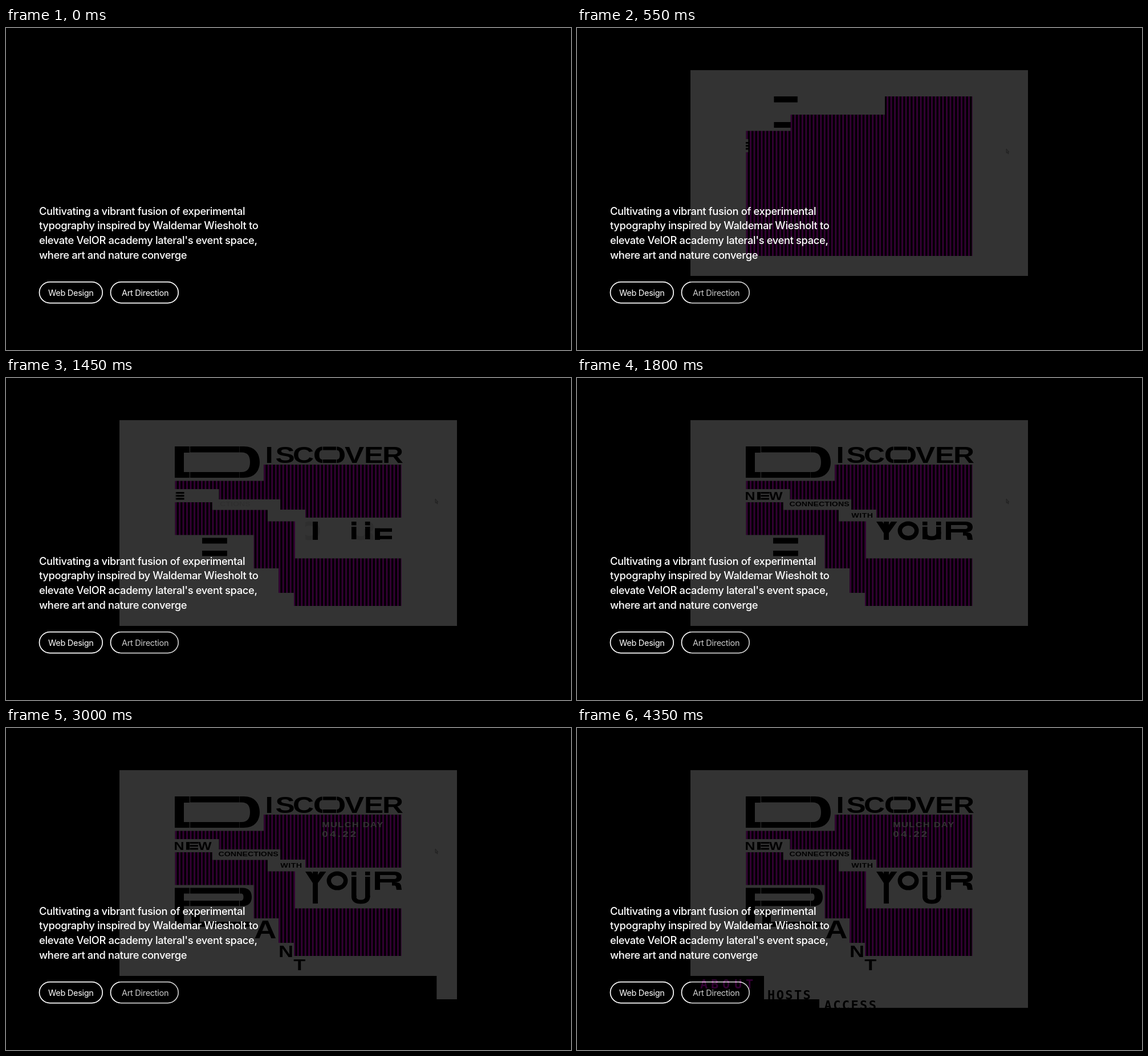
Write an HTML page that moves like this. It is 991x565 px and loops after 4.4 s.

```html
<!DOCTYPE html>
<html lang="en">
<head>
<meta charset="utf-8">
<title>Project teaser</title>
<style>
html, body { margin: 0; width: 100%; height: 100%; overflow: hidden; background: #000; }
svg { display: block; width: 991px; height: 565px; }

.copy, .tag { font-family: Inter, "Open Sans", sans-serif; fill: #fff; letter-spacing: -.02em; }
.copy { font-size: 18.36px; font-weight: 500; }
.tag { font-size: 14.5px; }
.pill { fill: none; stroke: #fff; stroke-width: 1.7; }
.wide { font-family: "Liberation Sans", Arial, sans-serif; font-weight: 700; transform: scaleX(1.25); }
.mono { font: 700 22px "DejaVu Sans Mono", monospace; letter-spacing: 2.4px; }

/* Every moving part goes from --from / --o to its resting pose within its time slot */
.a {
  --from: none; --o: 1;
  animation: 4.4s cubic-bezier(.37, 0, .63, 1) infinite;
  transform-box: fill-box;
}
.in { --from: translateX(-54px); --o: 0; }
.fade { --o: 0; }
.hole { --from: scaleX(0); transform-origin: left; }
.row { --from: scaleX(0); transform-origin: right; }
.bar { --from: scaleX(.48); transform-origin: center; }

@keyframes t300  { 0%, 6.7%   { transform: var(--from); opacity: var(--o) } 16.9%, 100%  { transform: none; opacity: 1 } }
@keyframes t325  { 0%, 7.39%  { transform: var(--from); opacity: var(--o) } 17.6%, 100%  { transform: none; opacity: 1 } }
@keyframes t500  { 0%, 11.3%  { transform: var(--from); opacity: var(--o) } 19.3%, 100%  { transform: none; opacity: 1 } }
@keyframes t550  { 0%, 12.5%  { transform: var(--from); opacity: var(--o) } 19.3%, 100%  { transform: none; opacity: 1 } }
@keyframes t850  { 0%, 19.32% { transform: var(--from); opacity: var(--o) } 30.68%, 100% { transform: none; opacity: 1 } }
@keyframes t1350 { 0%, 31%    { transform: var(--from); opacity: var(--o) } 40.8%, 100%  { transform: none; opacity: 1 } }
@keyframes t1900 { 0%, 43.2%  { transform: var(--from); opacity: var(--o) } 53.4%, 100%  { transform: none; opacity: 1 } }
@keyframes t2000 { 0%, 45.5%  { transform: var(--from); opacity: var(--o) } 55.7%, 100%  { transform: none; opacity: 1 } }
@keyframes t2600 { 0%, 58.5%  { transform: var(--from); opacity: var(--o) } 68%, 100%    { transform: none; opacity: 1 } }
@keyframes t2780 { 0%, 63.1%  { transform: var(--from); opacity: var(--o) } 91.4%, 100%  { transform: none; opacity: 1 } }
@keyframes t3150 { 0%, 71.6%  { transform: var(--from); opacity: var(--o) } 95.4%, 100%  { transform: none; opacity: 1 } }
@keyframes t3400 { 0%, 77.3%  { transform: var(--from); opacity: var(--o) } 89.8%, 100%  { transform: none; opacity: 1 } }

.screen { animation: show 4.4s linear infinite; }
@keyframes show { 0%, .6% { opacity: 0 } 4.5%, 100% { opacity: .2 } }
.cursor { animation: leave 4.4s ease-in infinite; }
@keyframes leave {
  0%, 95.4% { transform: none; opacity: 1 }
  98.75% { transform: translateX(23px); opacity: 1 }
  98.8%, 100% { transform: translateX(23px); opacity: 0 }
}
</style>
</head>
<body>
<svg viewBox="0 0 991 565">
  <defs>
    <pattern id="stripes" patternUnits="userSpaceOnUse" x="296.5" y="0" width="6.49" height="10">
      <rect width="6.49" height="10"/>
      <rect width="3.1" height="10" fill="#f0f"/>
    </pattern>
    <mask id="holes" maskUnits="userSpaceOnUse" x="290" y="110" width="410" height="300">
      <rect x="290" y="110" width="410" height="300" fill="#fff"/>
      <rect class="a hole" style="animation-name:t300" x="296" y="119" width="399" height="33"/>
      <rect class="a hole" style="animation-name:t325" x="296" y="119" width="156" height="61.5"/>
      <rect class="a hole" style="animation-name:t500" x="296" y="195" width="77.5" height="23"/>
      <rect class="a hole" style="animation-name:t550" x="362" y="213" width="119" height="18.5"/>
      <rect class="a hole" style="animation-name:t550" x="459" y="231" width="66" height="20.5"/>
      <rect class="a hole" style="animation-name:t550" x="507" y="245" width="188" height="71.5"/>
      <rect class="a hole" style="animation-name:t550" x="296" y="275.5" width="138.5" height="126"/>
      <rect class="a hole" style="animation-name:t550" x="434" y="334" width="44" height="67"/>
      <rect class="a hole" style="animation-name:t550" x="478" y="377" width="27" height="24"/>
    </mask>
    <clipPath id="c296"><rect x="296" y="74" width="500" height="420"/></clipPath>
    <clipPath id="c373"><rect x="373" y="74" width="400" height="420"/></clipPath>
    <clipPath id="c410"><rect x="410" y="74" width="400" height="420"/></clipPath>
    <clipPath id="c449"><rect x="449" y="74" width="400" height="420"/></clipPath>
    <clipPath id="c481"><rect x="481" y="74" width="400" height="420"/></clipPath>
    <clipPath id="c525"><rect x="525" y="74" width="400" height="420"/></clipPath>
    <path id="half" d="M555 120.5C546 120.5 541 127 541 135S546 149 555 149V143C551 143 549.5 140 549.5 135S551 126.5 555 126.5Z"/>
  </defs>

  <rect class="pill" x="58.5" y="445.6" width="110.7" height="37" rx="18.5"/>
  <rect class="pill" x="183.5" y="445.6" width="118.7" height="37" rx="18.5"/>
  <text class="tag" x="74" y="470">Web Design</text>
  <text class="tag" x="203" y="470">Art Direction</text>

  <g class="screen">
    <rect x="199" y="74" width="592" height="361" fill="#fff"/>
    <rect x="199" y="435" width="592" height="56"/>

    <!-- D -->
    <g clip-path="url(#c296)">
      <path class="a in" style="animation-name:t850" d="M296 120H322V131H312V165H322V175H296Z"/>
    </g>
    <path class="a bar" style="animation-name:t850" d="M323 120H409.5V130.5H323ZM323 165H409.5V175H323Z"/>
    <g clip-path="url(#c410)">
      <path class="a in" style="animation-name:t850" d="M410 120H417C436 120 445 132 445 147.5S436 175 417 175H410V165H413C424 165 428 158 428 147.5S424 130.5 413 130.5H410Z"/>
    </g>

    <!-- ISCOVER -->
    <g clip-path="url(#c449)">
      <g class="a in" style="animation-name:t850">
        <text class="wide" font-size="41" x="363.7 378 402.4 475.2 502.4 528" y="149">ISCVER</text>
        <use href="#half"/>
        <use href="#half" transform="matrix(-1 0 0 1 1135 0)"/>
      </g>
    </g>
    <path class="a bar" style="--from:scaleX(.4);animation-name:t850" d="M556 120.5H579V126.5H556ZM556 143H579V149H556Z"/>

    <!-- NEW -->
    <g clip-path="url(#c296)">
      <g class="a in" style="animation-name:t1350">
        <text class="wide" font-size="20" x="235.6 269.6" y="213.7">NW</text>
        <rect x="316" y="200" width="6" height="13.7"/>
      </g>
      <path class="a" style="--from:translateX(-27px);animation-name:t1350" d="M322.5 200H337V203H322.5ZM322.5 205.3H337V208.3H322.5ZM322.5 210.6H337V213.6H322.5Z"/>
    </g>

    <g clip-path="url(#c373)"><g class="a in" style="animation-name:t1350">
      <text class="wide" font-size="11.4" x="298" y="225.5">CONNECTIONS</text>
    </g></g>
    <g clip-path="url(#c481)"><g class="a in" style="animation-name:t1350">
      <text class="wide" font-size="11.4" letter-spacing=".4" x="385" y="245">WITH</text>
    </g></g>

    <!-- YOUR -->
    <g clip-path="url(#c525)">
      <g class="a in" style="animation-name:t1350">
        <path d="M525 252H535.5L543 263.5L551 252H561.5L547 272H538Z"/>
        <ellipse cx="581" cy="268" rx="14.7" ry="12.8" fill="none" stroke="#000" stroke-width="7.5"/>
        <path d="M677 252H681C690 252 694 256 694 261.5S690 271 681 271H677V265H680C684 265 685 263.5 685 261.5S684 258 680 258H677Z"/>
        <path d="M677 271H683C690 271 692 273 693 277L694 284H685L684 279C683.5 277 683 276.5 680 276.5H677Z"/>
      </g>
    </g>
    <rect class="a" style="--from:scaleY(.571);transform-origin:top;animation-name:t2000" x="538" y="252" width="9" height="56"/>
    <path d="M606 252H614.5V258.5H606ZM630 252H638.5V258.5H630Z"/>
    <path class="a" style="--from:scaleY(.61);transform-origin:top;animation-name:t2000" d="M606 261H614.5V297H606ZM630 261H638.5V297H630Z"/>
    <g class="a" style="--from:translateY(-24px);animation-name:t2000">
      <path class="a fade" style="animation-name:t1350" d="M606 294V296C606 304 612 308.5 622.2 308.5S638.5 304 638.5 296V294H630V296C630 300 627 301.5 622.2 301.5S614.5 300 614.5 296V294Z"/>
    </g>
    <rect class="a" style="--from:scaleY(.6);transform-origin:bottom;animation-name:t1350" x="647" y="252" width="9" height="32"/>
    <path class="a" style="--from:translateY(13px);animation-name:t1350" d="M656 252H677V258H656ZM656 265H677V271H656Z"/>

    <!-- PLANT -->
    <g clip-path="url(#c296)">
      <path class="a in" style="animation-name:t1900" d="M296 280.5H322V290.5H312V303H322V312.5H312V346H296Z"/>
    </g>
    <path class="a bar" style="--from:scaleX(.51);animation-name:t1900" d="M323 280.5H409V290.5H323ZM323 303H409V312.5H323Z"/>
    <g clip-path="url(#c410)">
      <path class="a in" style="animation-name:t1900" d="M410 280.5H415C426 280.5 431 287 431 296.5S426 312.5 415 312.5H410V303H412C415 303 416.5 301 416.5 296.5S415 290.5 412 290.5H410Z"/>
    </g>
    <path class="a" style="--from:translateX(-14px);--o:0;animation-name:t2600" d="M325 318H340V340H431V349H325Z"/>
    <g class="a fade" style="--from:translateX(-20px);animation-name:t2000">
      <text class="wide" font-size="43.5" x="348.3" y="369">A</text>
      <text class="wide" font-size="29" x="382.4" y="402">N</text>
      <text class="wide" font-size="27.6" x="403.4" y="425">T</text>
    </g>

    <rect x="296.5" y="120" width="397" height="280" fill="url(#stripes)" mask="url(#holes)"/>

    <g class="a fade" style="animation-name:t2600" fill="#fff">
      <text class="wide" font-size="13" letter-spacing="1.1" x="443.5" y="174.3">MULCH DAY</text>
      <text class="wide" font-size="15" letter-spacing="2.6" x="443.5" y="191.5">04.22</text>
    </g>

    <!-- Menu steps -->
    <rect class="a row" style="animation-name:t2780" x="328" y="434" width="463" height="42" fill="#fff"/>
    <rect class="a row" style="animation-name:t3150" x="425" y="475" width="366" height="16" fill="#fff"/>
    <text class="mono a fade" style="animation-name:t3400" x="216 235 255 276 296" y="456.5" fill="#f0f">ABOUT</text>
    <text class="mono" x="334" y="475.5">HOSTS</text>
    <svg x="425" y="476" width="120" height="15" style="width:120px;height:15px">
      <text class="mono" x="8.5" y="17.5">ACCESS</text>
    </svg>

    <path class="cursor" d="M753 212V219.5L754.7 218L756 221L757 220.5L755.8 217.6H758Z" fill="#ddd" stroke="#777" stroke-width=".6"/>
  </g>

  <g class="copy">
    <text x="58" y="327.7">Cultivating a vibrant fusion of experimental</text>
    <text x="58" y="353.4">typography inspired by Waldemar Wiesholt to</text>
    <text x="58" y="379.1">elevate VelOR academy lateral's event space,</text>
    <text x="58" y="404.8">where art and nature converge</text>
  </g>
</svg>
</body>
</html>
```
